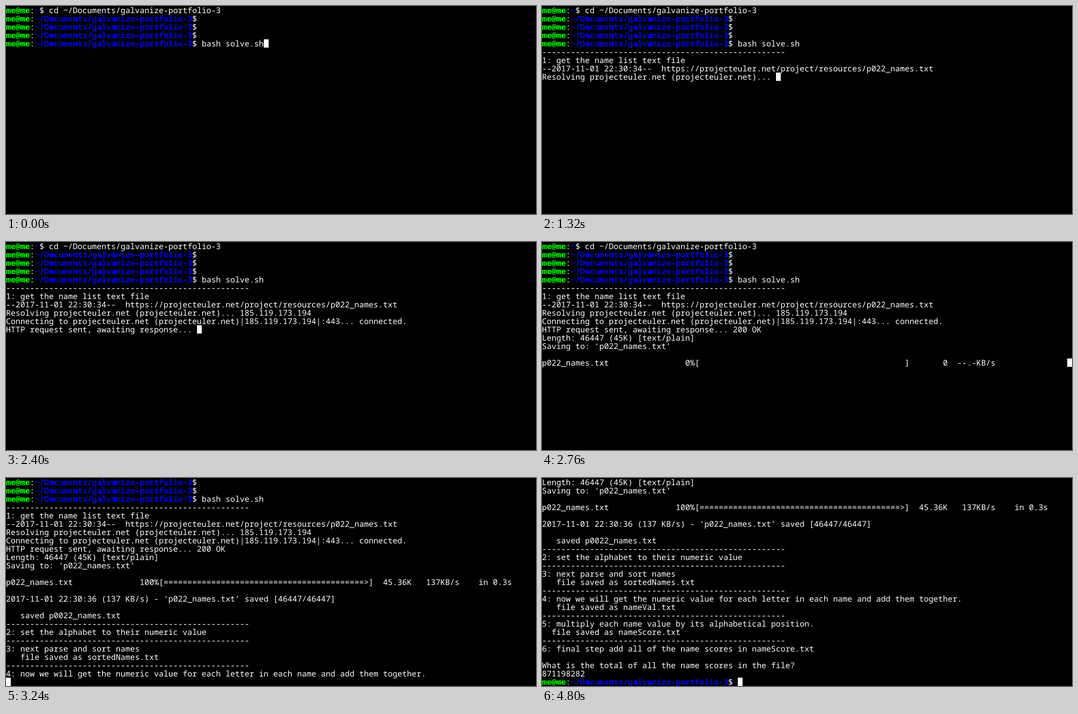
Recreate the animation shown at these times as an HTML page. Size 888 by 350 pixels, loop 7200 ms.

```html
<!DOCTYPE html>
<html lang="en">
<head>
<meta charset="utf-8">
<title>Terminal session</title>
<style>
  html, body { margin: 0; width: 100%; height: 100%; overflow: hidden; background: #000; }
  svg { display: block; width: 888px; height: 350px; }
  text {
    font: 300 13.3333px "Noto Sans Mono", monospace;
    white-space: pre;
    fill: #fff;
    text-rendering: geometricPrecision;
  }
  .user, .path { font-weight: bold; }
  .user { fill: #0f0; }
  .path { fill: #00f; }
  #cursor { fill: #fff; }
</style>
</head>
<body>
<svg viewBox="0 0 888 350">
  <g id="screen"></g>
  <rect id="cursor" width="8" height="14"/>
</svg>
<script>
const LOOP = 7200, CELL_W = 8, CELL_H = 14, BASELINE = 12, COLS = 111, ROWS = 25;
const screen = document.getElementById('screen');
const cursor = document.getElementById('cursor');

const prompt = 'me@me:~/Documents/galvanize-portfolio-3$ ';
const rule = '-'.repeat(51) + '\n';
const file = 'p022_names.txt';
const host = 'projecteuler.net';
const address = '185.119.173.194';

// A carriage return makes the new bar replace the current line.
function progress(percent, bar, size, speed, tail = '') {
  return '\r' + file.padEnd(28) + `${percent}%`.padStart(4) +
    `[${bar.padEnd(43)}]` + size.padStart(8) + speed.padStart(10) + tail;
}
const arrow = n => '='.repeat(n) + '>';
const toEdge = line => line.padEnd(COLS);

// Output written to the terminal at each time in ms.
const output = [
  [0, 'me@me:~$ cd ~/Documents/galvanize-portfolio-3\n' +
      (prompt + '\n').repeat(3) + prompt + 'bash solve.sh'],
  [1320, '\n' + rule + '1: get the name list text file\n' +
      `--2017-11-01 22:30:34--  https://${host}/project/resources/${file}\n` +
      `Resolving ${host} (${host})... `],
  [1560, `${address}\nConnecting to ${host} (${host})|${address}|:443... `],
  [1800, 'connected.\n'],
  [2400, 'HTTP request sent, awaiting response... '],
  [2760, `200 OK\nLength: 46447 (45K) [text/plain]\nSaving to: ‘${file}’\n\n` +
      toEdge(progress(0, '', '0', '--.-KB/s'))],
  [3000, toEdge(progress(83, arrow(34), '37.85K', '172KB/s'))],
  [3240, progress(100, arrow(42), '45.36K', '137KB/s', '    in 0.3s') + '\n\n' +
      `2017-11-01 22:30:36 (137 KB/s) - ‘${file}’ saved [46447/46447]\n\n` +
      '   saved p0022_names.txt\n' + rule +
      '2: set the alphabet to their numeric value\n' + rule +
      '3: next parse and sort names\n   file saved as sortedNames.txt\n' + rule +
      '4: now we will get the numeric value for each letter in each name and add them together.\n'],
  [4800, '   file saved as nameVal.txt\n' + rule +
      '5: multiply each name value by its alphabetical position.\n' +
      '  file saved as nameScore.txt\n' + rule +
      '6: final step add all of the name scores in nameScore.txt\n\n' +
      'What is the total of all the name scores in the file?\n871198282\n' + prompt]
];

let buffer = '';
const states = output.map(([time, text]) => {
  buffer = (buffer + text).replace(/[^\n]*\r/g, '');
  return { time, lines: buffer.split('\n').slice(-ROWS) };
});

function svgNode(tag, attrs, text) {
  const node = document.createElementNS('http://www.w3.org/2000/svg', tag);
  for (const name in attrs) node.setAttribute(name, attrs[name]);
  if (text) node.textContent = text;
  return node;
}

function drawLine(line, row) {
  const at = { x: 0, y: row * CELL_H + BASELINE };
  const parts = line.match(/^(me@me)(:)(~[^$]*)(\$.*)$/);
  if (!parts) return svgNode('text', at, line);
  const node = svgNode('text', at);
  ['user', '', 'path', ''].forEach((kind, i) =>
    node.append(svgNode('tspan', { class: kind }, parts[i + 1])));
  return node;
}

function draw({ lines }) {
  screen.replaceChildren(...lines.map(drawLine));
  const row = lines.length - 1;
  cursor.setAttribute('x', Math.min(lines[row].length, COLS - 1) * CELL_W);
  cursor.setAttribute('y', row * CELL_H);
}

let shown;
function tick() {
  const now = performance.now() % LOOP;
  const state = states.findLast(s => s.time <= now);
  if (state !== shown) draw(shown = state);
  requestAnimationFrame(tick);
}
tick();
</script>
</body>
</html>
```
